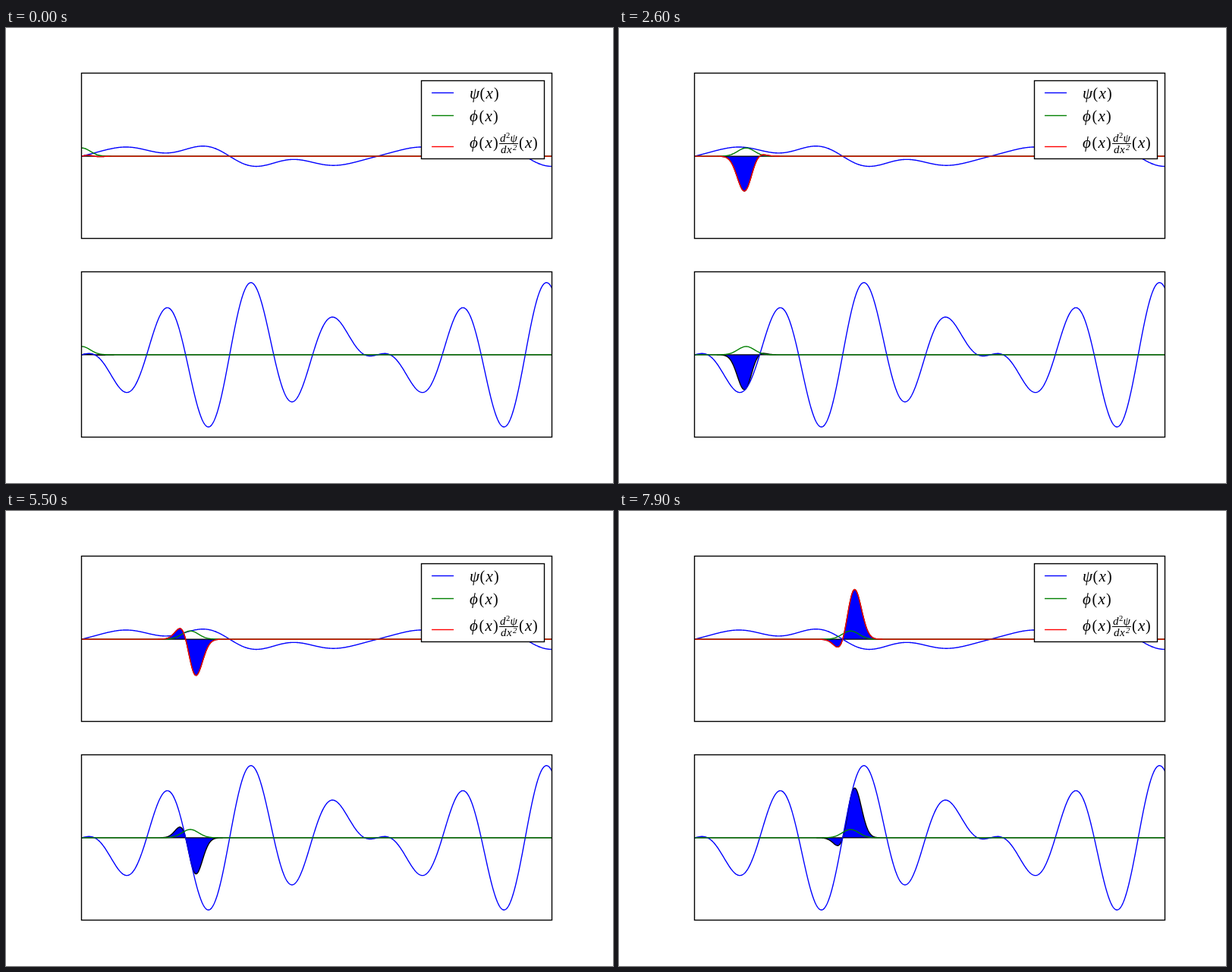
Write an HTML page with a canvas that moves like this. It is 800x600 px and loops after 8 s.

```html
<!DOCTYPE html>
<html lang="en">
<head>
<meta charset="utf-8">
<title>Wave and moving bump</title>
<style>
  html, body { margin: 0; width: 800px; height: 600px; overflow: hidden; background: #fff; }
  canvas, svg { position: absolute; left: 0; top: 0; display: block; }
  text { font: 20px "Liberation Serif", serif; }
  .var { font-style: italic; font-size: 21px; }
  .frac { font-style: italic; font-size: 15px; }
  .sup { font-size: 10.5px; }
  .key, .box { fill: none; stroke-width: 1.39; }
  .box { fill: #fff; stroke: #000; }
</style>
</head>
<body>
<canvas id="plot" width="800" height="600"></canvas>
<svg width="800" height="600" viewBox="0 0 800 600">
  <rect class="box" x="547.5" y="69.5" width="162" height="103"/>
  <path class="key" stroke="#00f" d="M561 85.5h29"/>
  <path class="key" stroke="#008000" d="M561 115.5h29"/>
  <path class="key" stroke="#f00" d="M561 156.5h29"/>

  <text y="92.5"><tspan class="var" x="611">ψ</tspan><tspan x="624.5">(</tspan><tspan class="var" x="632.5">x</tspan><tspan x="643">)</tspan></text>
  <text y="122.5"><tspan class="var" x="611">ϕ</tspan><tspan x="623.5">(</tspan><tspan class="var" x="631.5">x</tspan><tspan x="642">)</tspan></text>
  <text y="157.5"><tspan class="var" x="611">ϕ</tspan><tspan x="623.5">(</tspan><tspan class="var" x="631.5">x</tspan><tspan x="642">)</tspan><tspan x="676">(</tspan><tspan class="var" x="684">x</tspan><tspan x="694">)</tspan></text>
  <text class="frac" y="149.5"><tspan x="651">d</tspan><tspan class="sup" x="659" y="144.5" font-style="normal">2</tspan><tspan x="664.5" y="149.5">ψ</tspan></text>
  <path d="M650 152.5h25" stroke="#000"/>
  <text class="frac" y="164.5"><tspan x="652">d</tspan><tspan x="660">x</tspan><tspan class="sup" x="668" y="160.5">2</tspan></text>
</svg>
<script>
const ctx = document.getElementById("plot").getContext("2d");
const LEFT = 100, WIDTH = 620, SPAN = 10, UNIT = 10.909;
const SAMPLES = 1000, FRAME_MS = 100, FRAMES = 80, STEP = 0.0419;
const GREEN = "#008000", RED = "#f00", BLUE = "#00f", BLACK = "#000";
const { sin, exp } = Math;

const psi = x => sin(x) + 0.5 * sin(3 * x) - 0.25 * sin(4 * x);
const curvature = x => -sin(x) - 4.5 * sin(3 * x) + 4 * sin(4 * x);

function trace(f, mid) {
  ctx.beginPath();
  for (let i = 0; i <= SAMPLES; i++) {
    const u = i / SAMPLES;
    ctx.lineTo(LEFT + WIDTH * u, mid - UNIT * f(SPAN * u));
  }
}

function line(f, mid, color) {
  trace(f, mid);
  ctx.strokeStyle = color;
  ctx.stroke();
}

function area(f, mid) {
  trace(f, mid);
  ctx.lineTo(LEFT + WIDTH, mid);
  ctx.lineTo(LEFT, mid);
  ctx.closePath();
  ctx.fillStyle = BLUE;
  ctx.fill();
  ctx.strokeStyle = BLACK;
  ctx.stroke();
}

function panel(top, bottom, mid, wave, bump, product, outlined) {
  ctx.save();
  ctx.beginPath();
  ctx.rect(LEFT, top, WIDTH, bottom - top);
  ctx.clip();
  area(product, mid);
  line(wave, mid, BLUE);
  line(bump, mid, GREEN);
  if (outlined) line(product, mid, RED);
  ctx.restore();
  ctx.strokeStyle = BLACK;
  ctx.strokeRect(LEFT - 0.5, top, WIDTH, bottom - top);
}

function draw(frame) {
  const center = frame * STEP;
  const bump = x => exp(-16 * (x - center) ** 2);
  const product = x => bump(x) * curvature(x);
  ctx.fillStyle = "#fff";
  ctx.fillRect(0, 0, 800, 600);
  ctx.lineWidth = 1.39;
  panel(59.5, 277.5, 169.09, psi, bump, product, true);
  panel(321.5, 539.5, 430.91, curvature, bump, product, false);
}

const start = performance.now();
let shown = -1;
function tick() {
  const elapsed = Math.max(0, performance.now() - start);
  const frame = Math.floor(elapsed / FRAME_MS) % FRAMES;
  if (frame !== shown) draw(shown = frame);
  requestAnimationFrame(tick);
}
tick();
</script>
</body>
</html>
```
